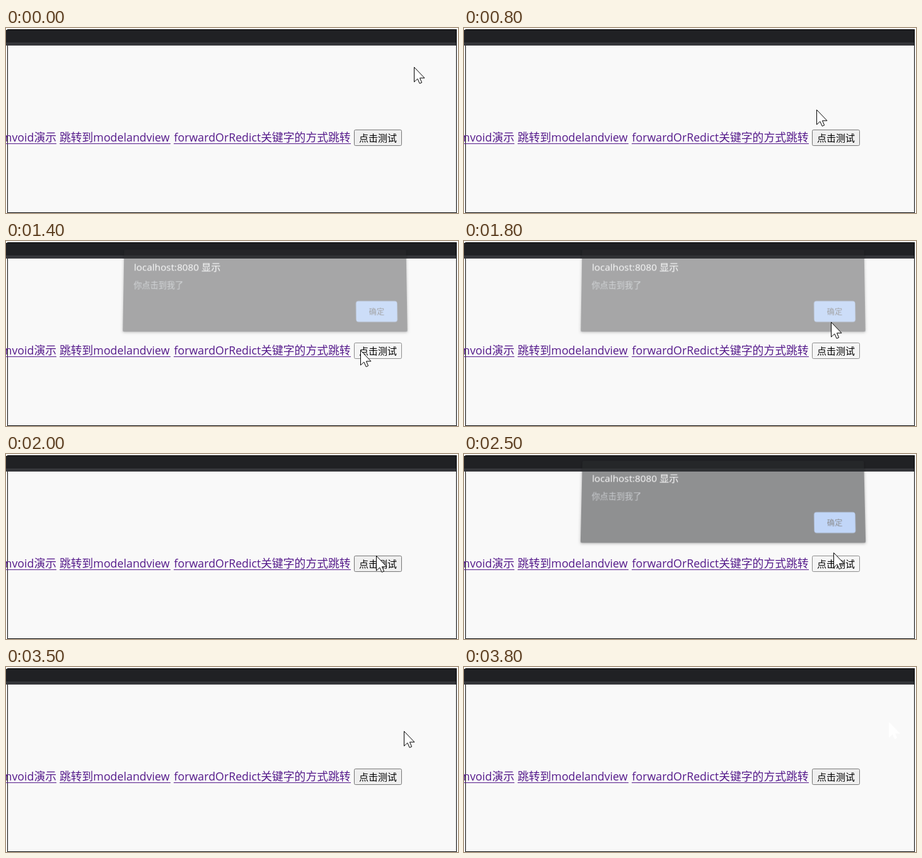
Recreate the animation shown at these times as an HTML page. Size 717 by 295 pixels, loop 4100 ms.

```html
<!DOCTYPE html>
<html lang="zh-CN">
<head>
<meta charset="utf-8">
<style>
  html, body { margin: 0; width: 100%; height: 100%; overflow: hidden; background: #fff; }
  body { position: relative; font-family: "Open Sans", "Noto Sans CJK SC", "Noto Sans CJK", sans-serif; }
  svg { position: absolute; left: 0; top: 0; width: 717px; height: 295px; }
  .link text { font-size: 17.8px; fill: #551a8b; }
  .link rect { fill: #551a8b; height: 1px; }
  #dialog {
    position: absolute; left: 187px; top: 22px; width: 448px; height: 131px;
    background: #292a2d; border-radius: 2px; box-shadow: 0 1px 4px rgba(0, 0, 0, .6);
  }
  #dialog svg { width: 448px; height: 131px; }
</style>
</head>
<body>
<svg viewBox="0 0 717 295">
  <rect x="2" y="2" width="713" height="293" fill="#000"/>
  <rect x="3" y="3" width="711" height="291" fill="#f9f9f9"/>
  <rect y="3" width="714" height="20" fill="#202124"/>
  <rect y="23" width="714" height="5" fill="#35363a"/>
  <g class="link">
    <text x="80" y="181" text-anchor="end">nvoid演示</text>
    <rect y="184" width="80"/>
    <text x="85" y="181">跳转到modelandview</text>
    <rect x="85" y="184" width="176"/>
    <text x="266.5" y="181">forwardOrRedict关键字的方式跳转</text>
    <rect x="266" y="184" width="281"/>
  </g>
  <rect id="button" x="552.5" y="162.5" width="75" height="25" rx="2"/>
  <text x="590" y="181" font-size="15" text-anchor="middle">点击测试</text>
</svg>

<div id="dialog">
  <svg viewBox="187 22 448 131">
    <clipPath id="okShape"><rect x="554.5" y="104.5" width="65" height="33" rx="4"/></clipPath>
    <text x="203" y="56.5" font-size="15.3" font-weight="500" fill="#fff">localhost:8080 显示</text>
    <text x="203" y="84" font-size="13.1" fill="#9aa0a6">你点击到我了</text>
    <g clip-path="url(#okShape)">
      <rect id="ok" x="554" y="104" width="66" height="34"/>
      <circle id="ripple" cx="584" cy="119" r="27" fill="#7594cb"/>
    </g>
    <text x="587" y="126" font-size="12.2" text-anchor="middle" fill="#202124">确定</text>
  </svg>
</div>

<svg viewBox="0 0 717 295">
  <path id="cursor" d="M.5 .5V24L5.8 19L9.2 26.5L12.6 25L9.5 17.8H17Z" fill="#fff"/>
</svg>

<script>
  const LOOP = 4100, STEP = 100;
  const el = id => document.getElementById(id);
  const mix = (a, b, k) => a + (b - a) * k;
  const ease = k => k * k * (3 - 2 * k);

  // Turning points of the pointer's path
  const stops = [
    { t: 0, x: 647, y: 62 },
    { t: 400, x: 448, y: 172 },
    { t: 800, x: 559, y: 130 },
    { t: 900, x: 563, y: 166 },
    { t: 1400, x: 562, y: 174 },
    { t: 1700, x: 580, y: 118 },
    { t: 2000, x: 587, y: 162 },
    { t: 2500, x: 586, y: 157 },
    { t: 2800, x: 587, y: 114 },
    { t: 2900, x: 634, y: 92 },
    { t: 3300, x: 588, y: 116 },
    { t: 3700, x: 674, y: 88 }
  ];

  // The dialog appears half faded and lifted for one step, and leaves the same way
  const showings = [
    { open: 1400, close: 1800, fade: .4, lift: 8.7 },
    { open: 2500, close: 3400, fade: .51, lift: 11.7 }
  ];

  function cursorAt(t) {
    const next = stops.findIndex(s => s.t > t);
    if (next < 0) return stops[stops.length - 1];
    const a = stops[next - 1], b = stops[next];
    const k = ease((t - a.t) / (b.t - a.t));
    return { x: mix(a.x, b.x, k), y: mix(a.y, b.y, k) };
  }

  function dialogAt(t) {
    const show = showings.find(s => t >= s.open && t <= s.close);
    if (!show) return { fade: 0, lift: 0 };
    return t === show.open || t === show.close ? show : { fade: 1, lift: 0 };
  }

  function set(id, attributes) {
    for (const name in attributes) el(id).setAttribute(name, attributes[name]);
  }

  function draw(t) {
    const { x, y } = cursorAt(t);
    set('cursor', {
      transform: `translate(${Math.round(x)} ${Math.round(y)})`,
      stroke: t < 3800 ? '#000' : '#fff'
    });

    const { fade, lift } = dialogAt(t);
    const dialog = el('dialog').style;
    dialog.opacity = fade;
    dialog.transform = lift
      ? `translateY(${-lift}px) perspective(1000px) rotateX(${lift / 2}deg) scale(1.003)`
      : 'none';

    const pressed = showings.some(s => t < s.close && t >= mix(s.open, s.close, .4));
    set('ok', { fill: pressed ? '#7da3e0' : '#8ab4f8' });
    set('ripple', { opacity: pressed ? 1 : 0 });
    set('button', {
      fill: fade ? '#f5f5f5' : '#efefef',
      stroke: fade ? '#8d8d8d' : '#767676'
    });
  }

  function tick() {
    const t = performance.now() % LOOP;
    draw(Math.floor(t / STEP) * STEP);
    requestAnimationFrame(tick);
  }
  tick();
</script>
</body>
</html>
```
